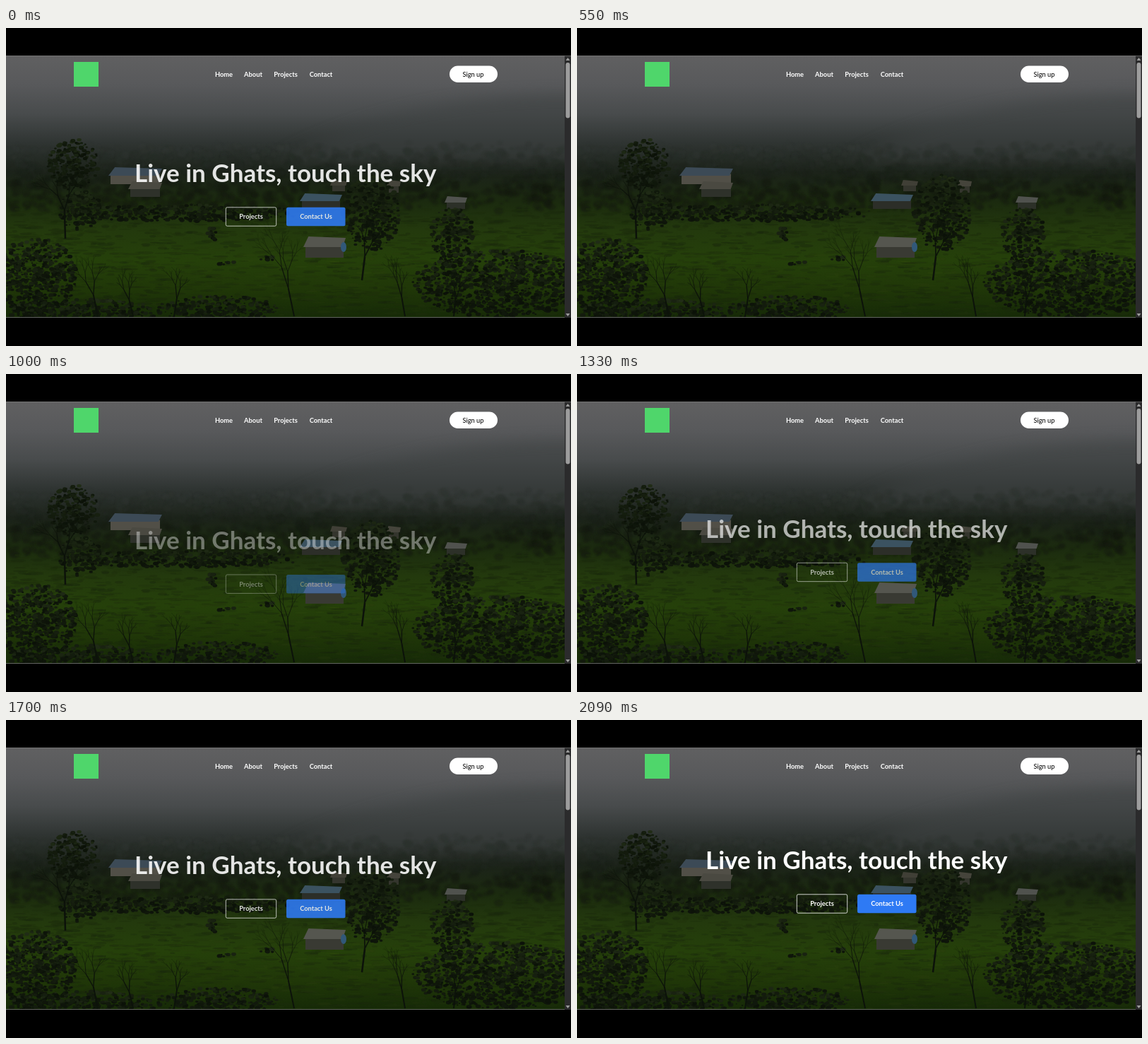
An HTML page with a canvas that plays this animation: 800x450 px, repeating every 2.12 s.

```html
<!DOCTYPE html>
<html lang="en">
<head>
<meta charset="utf-8">
<title>Live in Ghats</title>
<style>
  html, body { margin: 0; width: 100%; height: 100%; overflow: hidden; background: #000; }
  canvas, svg { position: absolute; left: 0; top: 0; width: 800px; height: 450px; }
  text { font: 700 9.3px Lato, "Open Sans", sans-serif; fill: #fff; text-anchor: middle; }
  .title { font-size: 35px; }
  .dark { fill: #111; font-weight: 500; }
</style>
</head>
<body>
<canvas id="photo" width="800" height="450"></canvas>
<svg viewBox="0 0 800 450">
  <rect x="96" y="48" width="35" height="35" fill="#4fd66b"/>
  <text x="308.5" y="69">Home</text>
  <text x="350" y="69">About</text>
  <text x="396" y="69">Projects</text>
  <text x="446" y="69">Contact</text>
  <rect x="628" y="53.5" width="68" height="23.5" rx="11.75" fill="#fff"/>
  <text class="dark" x="661.5" y="69">Sign up</text>

  <g id="hero">
    <text class="title" x="395.7" y="211">Live in Ghats, touch the sky</text>
    <rect x="311.3" y="246.6" width="71.4" height="26.4" rx="2" fill="none" stroke="#fff" stroke-width=".8"/>
    <text x="347" y="263.2">Projects</text>
    <rect x="397" y="246.6" width="83.5" height="26.4" rx="2.5" fill="#2f7bf5"/>
    <text x="439" y="263.2">Contact Us</text>
  </g>

  <path d="M0 39.5H800M0 409.5H791" stroke="#777" stroke-width=".8"/>
  <rect x="791" y="40" width="9" height="370" fill="#2b2b2c"/>
  <rect x="792.5" y="49" width="6" height="78.5" rx="3" fill="#9d9d9d"/>
  <path d="M795.5 42l3 4h-6zM795.5 408l3-4h-6z" fill="#9d9d9d"/>
</svg>
<script>
const ctx = document.getElementById('photo').getContext('2d');
let seed = 11;
const rnd = () => (seed = (seed * 16807) % 2147483647) / 2147483647;
const mix = (a, b, k) => `rgb(${a.map((v, i) => v + (b[i] - v) * k)})`;

function dab(x, y, rx, ry, color) {
  ctx.fillStyle = color;
  ctx.beginPath();
  ctx.ellipse(x, y, rx, ry, 0, 0, 2 * Math.PI);
  ctx.fill();
}

// Leaves scattered over an ellipse, lighter towards the top.
function clump(x, y, rx, ry) {
  for (let i = 0; i < rx * ry / 5; i++) {
    const a = rnd() * 2 * Math.PI, r = rnd() ** .6, s = 1 + rnd() * 3;
    const light = rnd() * (.6 - .4 * r * Math.sin(a));
    dab(x + rx * r * Math.cos(a), y + ry * r * Math.sin(a), s, s * .7, mix([11, 17, 8], [34, 46, 23], light));
  }
}

function branch(x, y, len, angle, width) {
  if (len < 4) return;
  const x2 = x + len * Math.cos(angle), y2 = y + len * Math.sin(angle);
  ctx.lineWidth = width;
  ctx.beginPath();
  ctx.moveTo(x, y);
  ctx.lineTo(x2, y2);
  ctx.stroke();
  for (const side of [-1, 1])
    branch(x2, y2, len * (.55 + rnd() * .25), angle + side * (.1 + rnd() * .35), width * .65);
}

function house(x, y, w, h, roof, wall) {
  ctx.fillStyle = wall;
  ctx.fillRect(x + 3, y + h * .4, w - 6, h * .6);
  ctx.fillStyle = roof;
  ctx.beginPath();
  ctx.moveTo(x, y + h * .5);
  ctx.lineTo(x + w * .12, y);
  ctx.lineTo(x + w, y + 2);
  ctx.lineTo(x + w * .93, y + h * .5);
  ctx.fill();
}

function paintPhoto() {
  ctx.rect(0, 39, 791, 371);
  ctx.clip();
  const base = ctx.createLinearGradient(0, 39, 0, 410);
  ['#606061', '#58595b', '#484b4c', '#2f3432', '#1c231a', '#1b2a0f', '#23390d', '#25400a', '#203708', '#162a07']
    .forEach((color, i) => base.addColorStop(i / 9, color));
  ctx.fillStyle = base;
  ctx.fillRect(0, 39, 800, 371);

  // Ridge fading into the mist on the right.
  ctx.filter = 'blur(10px)';
  ctx.fillStyle = '#3e424388';
  ctx.beginPath();
  ctx.moveTo(380, 190);
  ctx.quadraticCurveTo(560, 90, 820, 95);
  ctx.lineTo(820, 190);
  ctx.fill();

  // Woods darken from the mist to the meadow's edge.
  ctx.filter = 'blur(1.2px)';
  ctx.globalAlpha = .4;
  for (let d = 0; d < 1; d += .0007) {
    const s = 2 + rnd() * 5;
    dab(rnd() * 800, 162 + 88 * d + rnd() * 10, s, s * .8, mix([52, 57, 55], [19, 26, 16], Math.min(1, d * 1.4 + rnd() * .2)));
  }

  // Grass streaks, brightest in the middle of the meadow.
  ctx.filter = 'blur(.7px)';
  for (let i = 0; i < 1800; i++) {
    const x = rnd() * 800, y = 256 + rnd() * 154;
    const glow = Math.exp(-(((x - 420) / 230) ** 2) - ((y - 335) / 50) ** 2);
    dab(x, y, 3 + rnd() * 10, .6 + rnd() * 1.6, mix([23, 36, 12], [48, 74, 12], rnd() * (.35 + .65 * glow)));
  }
  ctx.globalAlpha = 1;

  ctx.filter = 'blur(.5px)';
  house(145, 197, 76, 24, '#3c4a56', '#514f47');
  house(173, 217, 48, 22, '#4a4941', '#2e312a');
  house(459, 215, 24, 16, '#403f36', '#34352d');
  house(539, 215, 20, 18, '#45443b', '#34352d');
  house(416, 234, 60, 22, '#3b5260', '#2c2e28');
  house(621, 238, 32, 18, '#50524e', '#2c3028');

  [[95, 193, 36, 36], [105, 258, 30, 28], [250, 262, 170, 12], [517, 262, 40, 54], [632, 292, 30, 40],
   [42, 352, 58, 55], [700, 362, 125, 48], [300, 397, 85, 18], [110, 402, 110, 18], [291, 292, 9, 10],
   [315, 333, 22, 2], [371, 326, 12, 3]].forEach(c => clump(...c));

  house(421, 295, 60, 30, '#55564f', '#393a33');
  dab(478, 310, 4, 7, '#315879');

  ctx.filter = 'none';
  ctx.strokeStyle = '#0c120a';
  branch(84, 298, 40, -1.6, 2.5);
  branch(504, 357, 34, -1.45, 2.5);
  for (const x of [130, 180, 238, 408, 565, 634])
    branch(x, 408, 20 + 20 * Math.abs(Math.cos(x / 130)), -1.6 + (rnd() - .5) * .5, 2);
}

const hero = document.getElementById('hero');
const LOOP = 2120, RELOAD = 550, START = 630, LENGTH = 1520, RISE = 61;

function draw() {
  const t = performance.now() % LOOP;
  // The loop opens on the tail of a rise, holds, then reloads the page.
  const at = t < RELOAD ? 1700 + Math.min(t, 300) : t;
  const u = Math.min(1, Math.max(0, (at - START) / LENGTH));
  const left = (1 - u) ** 1.75;
  hero.setAttribute('transform', `translate(0 ${RISE * left})`);
  hero.setAttribute('opacity', 1 - left);
  requestAnimationFrame(draw);
}

paintPhoto();
draw();
</script>
</body>
</html>
```
